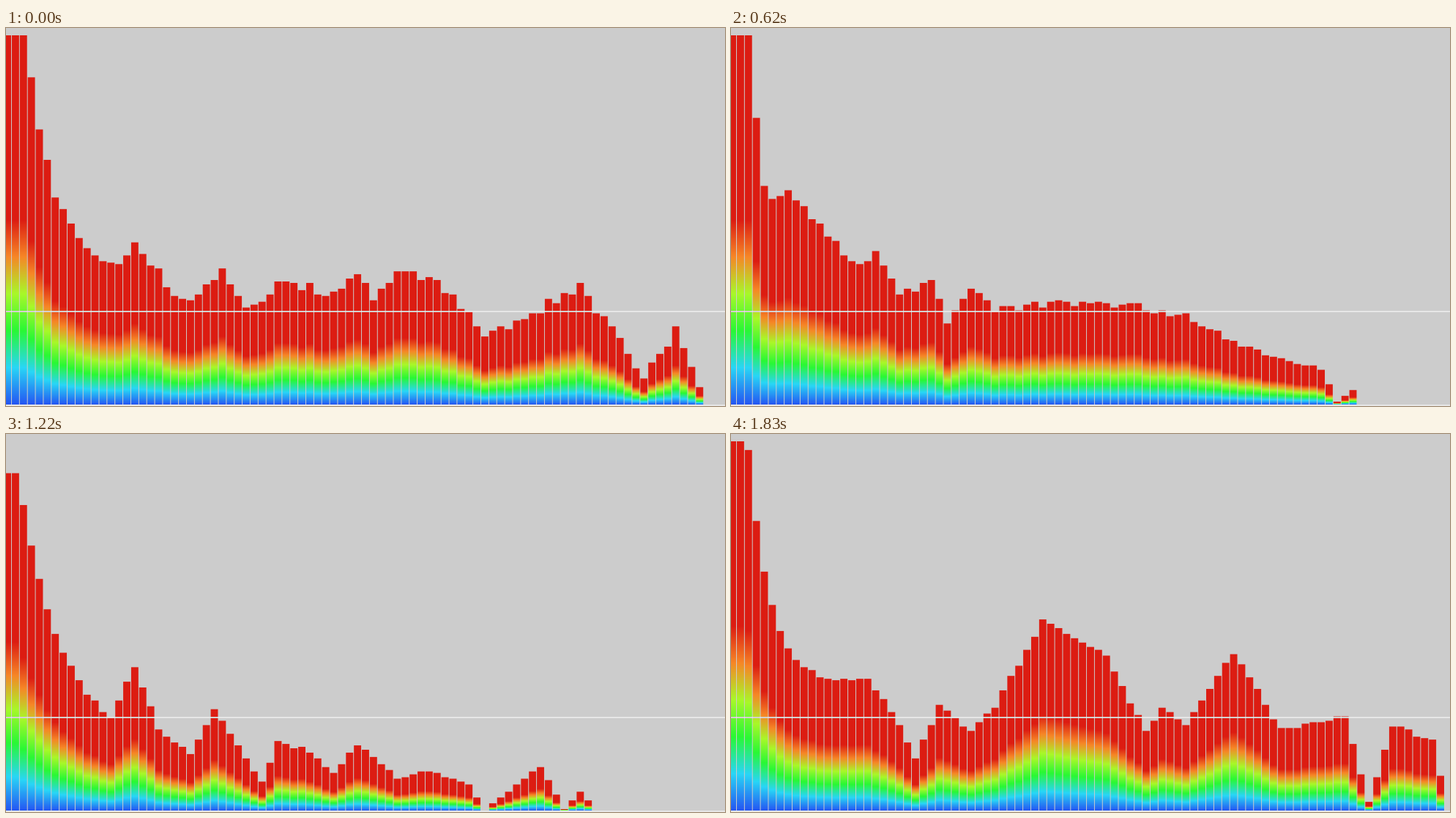
A matplotlib script that plays this animation: 982x516 px, repeating every 1910 ms.

```python
import matplotlib.pyplot as plt
import numpy as np
from matplotlib.animation import FuncAnimation

W, H = 982, 516
BASE, FULL, LEVELS = 514, 504, 255
BARS, PITCH, BAR_W, LEFT = 91, 10.865, 9.9, -2.9
TICK, LOOP = 10, 1910
LINE_ROWS = slice(386, 388)

BACK = np.array([204, 204, 204.0])
LINE = np.array([230, 230, 230.0])
LINE_ON_BAR = np.array([212, 208, 206.0])

# Colour ramp, measured from the foot of each bar as a share of its height
STOPS = [0, 0.1, 0.2, 0.3, 0.4, 0.5]
RAMP = np.array([
    [36, 84, 242], [40, 214, 246], [40, 248, 52],
    [168, 248, 40], [246, 134, 38], [220, 28, 18],
])

# When the picture is refreshed, in ms
STEPS = [0, 70, 150, 220, 300, 370, 450, 530, 620, 680, 760, 830, 910,
         990, 1070, 1140, 1220, 1310, 1380, 1450, 1530, 1600, 1680,
         1760, 1830]

rng = np.random.default_rng(7)
bar = np.arange(BARS)


def spectrum(bass, decay, body, rough=3, cap=FULL):
    """Bass falling off exponentially onto a body of hills, plus jitter.

    bass is the height of bar 3; body lists (bar, height) of hills and dips.
    """
    hills = np.interp(bar, *zip(*body))
    fall = (bass - body[0][1]) * np.exp((3 - bar) / decay)
    jitter = rng.uniform(-rough, rough, BARS) * np.clip(hills / 80, 0, 1)
    jitter[:4] = 0
    return np.clip(hills + fall + jitter, 0, cap)


opening = spectrum(446, 3.3, [
    (10, 185), (14, 182), (16, 208), (22, 142), (27, 178), (30, 132),
    (35, 172), (41, 148), (44, 175), (46, 148), (50, 184), (54, 172),
    (60, 92), (72, 160), (80, 38), (84, 100), (88, 0)], rough=8)

lull = spectrum(395, 4, [
    (13, 82), (16, 168), (20, 75), (23, 28), (26, 100), (32, 20),
    (38, 106), (43, 74), (47, 72), (51, 10), (53, 2), (55, 24), (60, 0),
    (63, 52), (68, 10), (69, 0)], cap=470)

beat = spectrum(391, 0.9, [
    (4, 260), (7, 294), (16, 186), (18, 206), (21, 154), (25, 164),
    (27, 116), (30, 162), (33, 128), (41, 140), (52, 132), (57, 120),
    (66, 72), (74, 50), (76, 4), (78, 22), (79, 0)], rough=6)

swell = spectrum(419, 2.8, [
    (10, 212), (14, 195), (16, 236), (20, 166), (23, 222), (27, 178),
    (30, 206), (33, 174), (35, 220), (38, 156), (44, 200), (50, 225),
    (54, 148), (68, 118), (72, 178), (75, 140), (79, 44), (85, 44),
    (86, 0)], rough=9)

fade = spectrum(361, 5.5, [
    (13, 82), (16, 172), (19, 98), (23, 68), (26, 132), (32, 38),
    (34, 92), (38, 80), (41, 50), (44, 90), (49, 44), (53, 54), (58, 36),
    (60, 0), (67, 62), (70, 2), (72, 26), (74, 0)], cap=460)

rise = spectrum(399, 3.2, [
    (12, 134), (15, 164), (20, 134), (23, 72), (26, 142), (29, 74),
    (32, 80), (34, 113), (40, 60), (43, 120), (48, 115), (52, 110),
    (55, 56), (57, 76), (62, 42), (66, 62), (70, 45), (74, 68), (76, 2),
    (77, 0)])

waves = spectrum(395, 2.8, [
    (10, 170), (17, 180), (20, 136), (23, 72), (26, 142), (30, 108),
    (33, 142), (39, 259), (47, 211), (52, 108), (54, 138), (57, 120),
    (63, 215), (69, 111), (77, 129), (80, 12), (83, 118), (88, 95),
    (90, 0)])

KEYS = [(0, opening), (370, lull), (620, beat), (910, swell),
        (1220, fade), (1450, rise), (1830, waves), (LOOP, opening)]

# Share of each pixel column covered by each bar
x = np.arange(W)
left = (LEFT + PITCH * bar)[:, None]
COVER = np.clip(np.minimum(x + 1, left + BAR_W) - np.maximum(x, left), 0, 1)


def heights(ms):
    """Blend the neighbouring poses and snap to the meter levels."""
    for (t0, a), (t1, b) in zip(KEYS, KEYS[1:]):
        if t0 <= ms < t1:
            mix = a + (b - a) * (ms - t0) / (t1 - t0)
            return np.round(mix * LEVELS / FULL) * FULL / LEVELS


def paint(ms):
    h = heights(ms)
    y = np.arange(H)[:, None]
    share = (BASE - y - 0.5) / np.maximum(h, 1)
    rgb = np.stack([np.interp(share, STOPS, c) for c in RAMP.T], axis=-1)
    inside = np.clip(y + 1 - (BASE - h), 0, 1) * (y < BASE)
    tint = (rgb - BACK) * inside[..., None]
    img = BACK + np.stack([tint[..., c] @ COVER for c in range(3)], axis=-1)
    on_bar = (inside[LINE_ROWS] @ COVER)[..., None]
    img[LINE_ROWS] = LINE + (LINE_ON_BAR - LINE) * on_bar
    img[BASE:] = LINE
    return np.clip(np.round(img), 0, 255).astype(np.uint8)


pictures = [paint(ms) for ms in STEPS]

fig = plt.figure(figsize=(W / 100, H / 100), dpi=100, facecolor="#cccccc")
stage = fig.figimage(pictures[0], origin="upper")


def update(i):
    step = np.searchsorted(STEPS, i * TICK, side="right") - 1
    stage.set_data(pictures[step])
    return [stage]


anim = FuncAnimation(fig, update, frames=LOOP // TICK, interval=TICK,
                     repeat=True, repeat_delay=0, blit=False)
plt.show()
```
